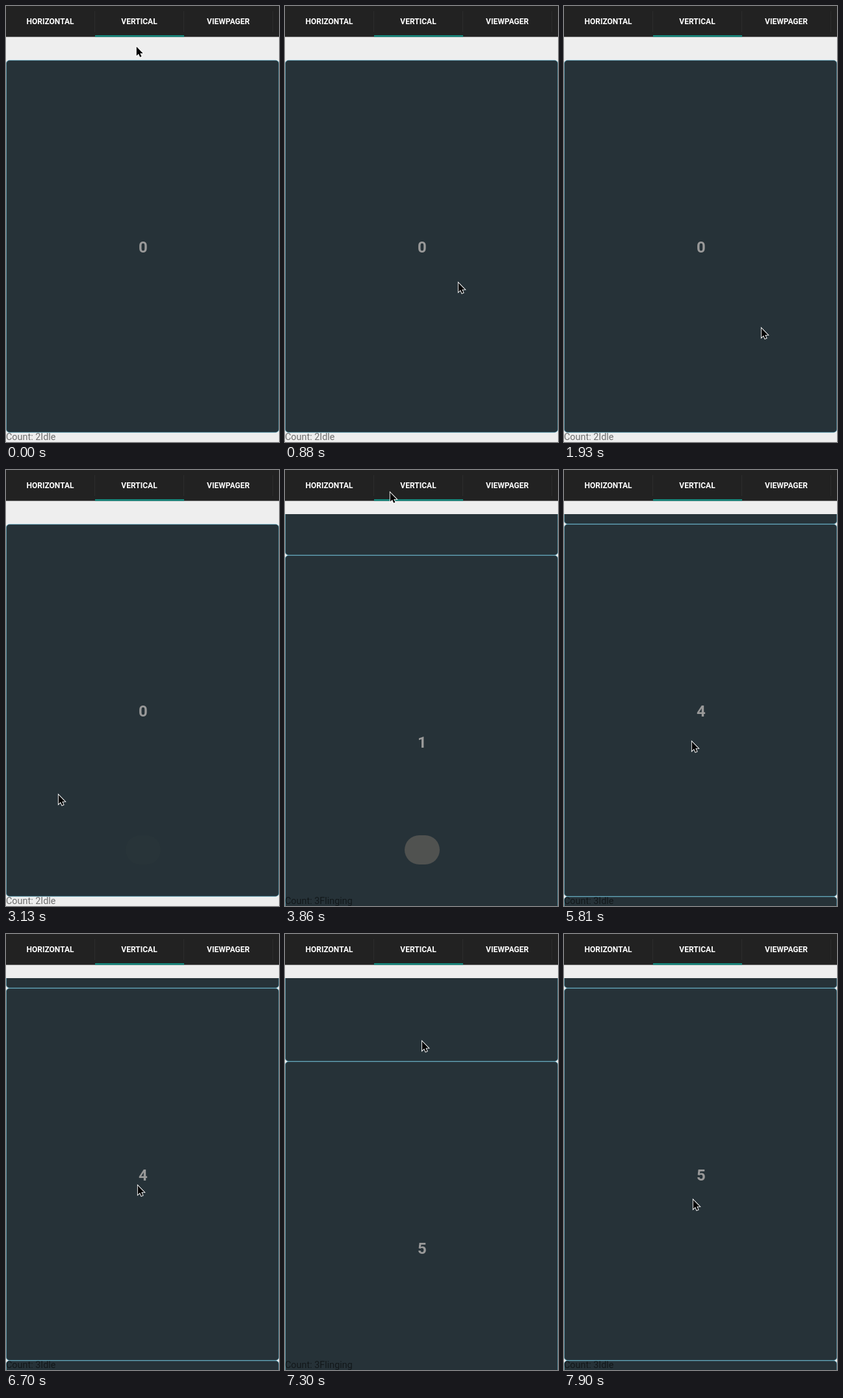
An HTML page with a canvas that plays this animation: 420x672 px, repeating every 8000 ms.

```html
<!DOCTYPE html>
<html lang="en">
<meta charset="utf-8">
<title>Vertical pager</title>
<style>
  html, body { margin: 0; width: 100%; height: 100%; overflow: hidden; background: #eee; }
  canvas { display: block; width: 420px; height: 672px; }
</style>
<canvas id="stage" width="420" height="672"></canvas>
<script>
const ctx = document.getElementById('stage').getContext('2d');
const LOOP = 8000, STEP = 149.1, PHASE = 17;
const PAGE_TOP = 83.7, PITCH = 574;

// Places the pointer travels between: time, x, y.
const stops = [
  [0, 200, 62], [880, 266, 426], [1180, 324, 522], [1480, 336, 628], [1920, 303, 496],
  [3120, 80, 500], [3560, 150, 432], [3860, 161, 34], [4460, 188, 430], [5050, 195, 389],
  [5800, 196, 418], [6690, 202, 387], [7590, 213, 192], [7885, 198, 409]
];

// A swipe turns pages and lifts the pointer; with no pages it springs back.
const swipes = [
  { start: 3565, end: 4367, pages: 3, lift: 0 },
  { start: 4640, end: 5050, pages: 1, lift: 240 },
  { start: 5900, end: 6450, pages: 0, lift: 120 },
  { start: 6760, end: 7500, pages: 1, lift: 100 }
];

const clamp = v => Math.min(1, Math.max(0, v));
const progress = (t, start, end) => clamp((t - start) / (end - start));
const ease = p => p * p * (3 - 2 * p);

function pointerAt(t) {
  let [, x, y] = stops[0];
  for (let i = 1; i < stops.length; i++) {
    const p = ease(progress(t, stops[i - 1][0], stops[i][0]));
    x += (stops[i][1] - stops[i - 1][1]) * p;
    y += (stops[i][2] - stops[i - 1][2]) * p;
  }
  return [x, y];
}

function sceneAt(t) {
  let [x, y] = pointerAt(t);
  let scroll = 0, state = 'Idle';
  for (const { start, end, pages, lift } of swipes) {
    const p = progress(t, start, end);
    const pull = lift * Math.sin(Math.PI * p);
    y -= pull;
    scroll += pages ? pages * ease(p) : pull / PITCH;
    if (p > 0 && p < 1) state = p < .35 ? 'Scrolling' : 'Flinging';
  }
  const toast = clamp(Math.min(t - 3100, 5600 - t) / 200);
  return { x, y, scroll, state, toast };
}

function rect(color, x, y, w, h) {
  ctx.fillStyle = color;
  ctx.fillRect(x, y, w, h);
}

function text(str, x, y, font, color, align = 'center') {
  ctx.font = font + ' Roboto, sans-serif';
  ctx.fillStyle = color;
  ctx.textAlign = align;
  ctx.fillText(str, x, y);
}

function drawTabs() {
  rect('#222', 0, 0, 420, 47.6);
  rect('#15897e', 137, 45, 137, 2.6);
  for (let i = 1; i <= 3; i++) rect('#2c2c2c', i * 137 - 1, 8, 1, 32);
  ['HORIZONTAL', 'VERTICAL', 'VIEWPAGER'].forEach((name, i) =>
    text(name, 68 + i * 137, 27.6, 'bold 12px', '#fff'));
}

function drawPage(index, y) {
  ctx.beginPath();
  ctx.roundRect(.4, y, 419.4, 573.5, 5);
  ctx.fillStyle = '#263238';
  ctx.fill();
  ctx.strokeStyle = '#58b9d6';
  ctx.lineWidth = .6;
  ctx.stroke();
  text(index, 211, y + 296, 'bold 24px', '#999');
}

function drawPages(scroll) {
  ctx.save();
  ctx.beginPath();
  ctx.rect(0, 68, 420, 604);
  ctx.clip();
  const first = Math.floor(scroll);
  const last = scroll > 0 ? first + 1 : 0;
  for (let i = Math.max(0, first - 1); i <= last; i++)
    drawPage(i, PAGE_TOP + Math.round((i - scroll) * PITCH));
  ctx.restore();
}

function drawToast(alpha) {
  ctx.globalAlpha = alpha;
  ctx.beginPath();
  ctx.roundRect(184, 563, 54, 45, 22.5);
  ctx.fillStyle = '#505250';
  ctx.fill();
  ctx.globalAlpha = 1;
}

function drawPointer(x, y) {
  ctx.save();
  ctx.translate(x + .8, y + .8);
  const arrow = new Path2D('M0 0V14L3.2 11L5.4 16L7.7 15L5.5 10.1H9.9Z');
  ctx.strokeStyle = '#fff';
  ctx.lineWidth = 1.8;
  ctx.stroke(arrow);
  ctx.fillStyle = '#000';
  ctx.fill(arrow);
  ctx.restore();
}

function draw(now) {
  const step = Math.floor((now % LOOP + PHASE) / STEP);
  const { x, y, scroll, state, toast } = sceneAt(step * STEP - PHASE);
  rect('#eee', 0, 0, 420, 672);
  drawTabs();
  drawPages(scroll);
  text(`Count: ${scroll > 0 ? 3 : 2}${state}`, 0, 669, '14.4px', 'rgba(0,0,0,.54)', 'left');
  drawToast(toast);
  drawPointer(x, y);
}

const start = performance.now();
(function tick() {
  draw(performance.now() - start);
  requestAnimationFrame(tick);
})();
</script>
</html>
```
